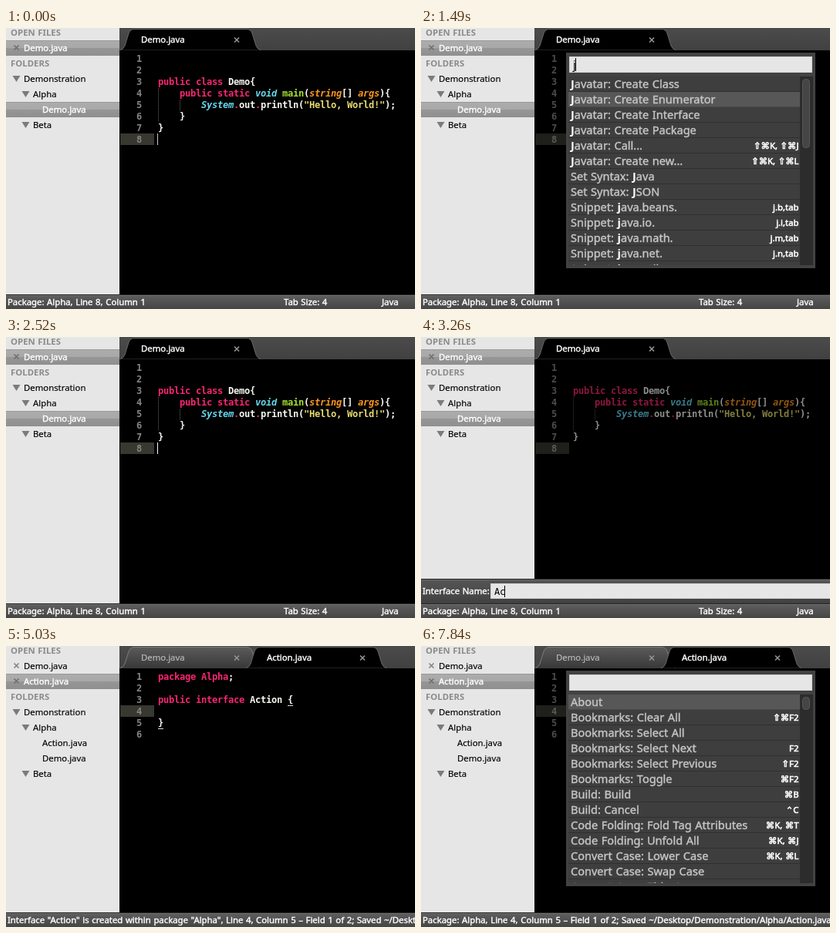
Recreate the animation shown at these times as an HTML page with a canvas. Size 530 by 365 pixels, loop 7.99 s.

```html
<!DOCTYPE html>
<html lang="en">
<head>
<meta charset="utf-8">
<title>Creating a Java interface from the command palette</title>
<style>
html, body { margin: 0; width: 100%; height: 100%; overflow: hidden; background: #000; }
canvas { display: block; }
</style>
</head>
<body>
<canvas id="stage" width="530" height="365"></canvas>
<script>
const ctx = document.getElementById('stage').getContext('2d');
const LOOP = 7990, LINE = 15, COL = 7, CODE_X = 197, CODE_Y = 32, SIDE = 147, ROW = 20;
const UI = '"Noto Sans", "Open Sans", "DejaVu Sans", sans-serif';
const MONO = '"DejaVu Sans Mono", monospace';
const SMALL = 11.35, LARGE = 14.55;

// Timelines: [start in ms, value]
const MODE = [[0, 'code'], [600, 'palette'], [2520, 'code'], [2670, 'panel'], [4290, 'code'], [7400, 'palette']];
const QUERY = [[0, ''], [1490, 'j'], [2080, 'jc'], [2230, 'jci'], [2520, '']];
const NAME = [[0, ''], [3120, 'A'], [3260, 'Ac'], [3550, 'Act'], [3700, 'Acti'], [3850, 'Actio'], [3990, 'Action']];
const CARET = [[0, .8], [150, 0], [600, 1], [1040, .5], [1190, 0], [1490, 1], [1930, .5], [2080, 1],
  [2970, .5], [3120, 1], [4880, .5], [5030, 0], [5470, .5], [5620, 1], [5770, .5], [5910, 0],
  [6360, .5], [6510, 1], [6810, .5], [6960, 0], [7400, 1], [7700, .5], [7840, 0]];
const PLACE = ' Line 4, Column 5 – Field 1 of 2; Saved ~/Desktop/Demonstration/Alpha/Action.java (UTF-8)';
const STATUS = [[0, 'Package: Alpha, Line 8, Column 1'], [4430, 'Package: Alpha,' + PLACE],
  [4730, 'Interface "Action" is created within package "Alpha",' + PLACE], [7400, 'Package: Alpha,' + PLACE]];
const at = (keys, t) => keys.findLast(([start]) => start <= t)[1];

const PINK = '#f92672', BLUE = '#66d9ef', GREEN = '#a6e22e', ORANGE = '#fd971f', YELLOW = '#e6db74', WHITE = '#f8f8f2';

// Code tokens: line, column, colour, text
const DEMO = { lines: 8, row: 8, col: 0, tokens: [
  [3, 0, PINK, 'public class'], [3, 13, WHITE, 'Demo{'],
  [4, 4, PINK, 'public static'], [4, 18, BLUE, 'void'], [4, 23, GREEN, 'main'], [4, 27, WHITE, '('],
  [4, 28, ORANGE, 'string'], [4, 34, WHITE, '[]'], [4, 37, ORANGE, 'args'], [4, 41, WHITE, '){'],
  [5, 8, BLUE, 'System'], [5, 14, PINK, '.'], [5, 15, WHITE, 'out'], [5, 18, PINK, '.'],
  [5, 19, WHITE, 'println('], [5, 27, YELLOW, '"Hello, World!"'], [5, 42, WHITE, ');'],
  [6, 4, WHITE, '}'], [7, 0, WHITE, '}']
] };
const ACTION = { lines: 6, row: 4, col: 4, tokens: [
  [1, 0, PINK, 'package Alpha'], [1, 13, WHITE, ';'],
  [3, 0, PINK, 'public interface'], [3, 17, WHITE, 'Action {'], [5, 0, WHITE, '}']
] };

// Palette rows: label|shortcut, a star marks the next letter as matched
const RESULTS = {
  '': ['About', 'Bookmarks: Clear All|⇧⌘F2', 'Bookmarks: Select All', 'Bookmarks: Select Next|F2',
    'Bookmarks: Select Previous|⇧F2', 'Bookmarks: Toggle|⌘F2', 'Build: Build|⌘B', 'Build: Cancel|⌃C',
    'Code Folding: Fold Tag Attributes|⌘K, ⌘T', 'Code Folding: Unfold All|⌘K, ⌘J',
    'Convert Case: Lower Case|⌘K, ⌘L', 'Convert Case: Swap Case', 'Convert Case: Title Case'],
  j: ['*Javatar: Create Class', '*Javatar: Create Enumerator', '*Javatar: Create Interface',
    '*Javatar: Create Package', '*Javatar: Call...|⇧⌘K, ⇧⌘J', '*Javatar: Create new...|⇧⌘K, ⇧⌘L',
    'Set Syntax: *Java', 'Set Syntax: *JSON', 'Snippet: *java.beans.|j.b,tab', 'Snippet: *java.io.|j.i,tab',
    'Snippet: *java.math.|j.m,tab', 'Snippet: *java.net.|j.n,tab', 'Snippet: *java.util.|j.u,tab'],
  jc: ['*Javatar: *Create Class', '*Javatar: *Create Enumerator', '*Javatar: *Create Interface',
    '*Javatar: *Create Package', '*Javatar: *Call...|⇧⌘K, ⇧⌘J', '*Javatar: *Create new...|⇧⌘K, ⇧⌘L',
    'Snippet: import *junit.framework.Test*Case;|i...', 'Set Syntax: *JavaS*cript',
    'Set Syntax: *JavaS*cript (Rails)', 'Set Syntax: Ob*je*ctive-C', 'Set Syntax: Ob*je*ctive-C++'],
  jci: ['*Javatar: *Create *Interface', 'Snippet: import *junit.framework.Test*Case;|i...',
    'Set Syntax: *JavaS*cr*ipt', 'Set Syntax: *JavaS*cr*ipt (Rails)',
    'Set Syntax: Ob*je*ct*ive-C', 'Set Syntax: Ob*je*ct*ive-C++']
};
const SCROLL_THUMB = { '': 16, j: 89 };

function rect(x, y, w, h, fill) {
  ctx.fillStyle = fill;
  ctx.fillRect(x, y, w, h);
}

function shade(y, h, ...colors) {
  const g = ctx.createLinearGradient(0, y, 0, y + h);
  colors.forEach((c, i) => g.addColorStop(i / (colors.length - 1), c));
  return g;
}

// Interface text; a thin outline of the given width makes it heavier
function text(str, x, y, color, { size = SMALL, weight = 400, align = 'left', heavy = 0 } = {}) {
  ctx.font = `${weight} ${size}px ${UI}`;
  ctx.wordSpacing = size * .056 + 'px';
  ctx.textAlign = align;
  ctx.fillStyle = ctx.strokeStyle = color;
  ctx.fillText(str, x, y);
  if (heavy) {
    ctx.lineWidth = heavy;
    ctx.strokeText(str, x, y);
  }
  return ctx.measureText(str).width;
}

const lightText = (str, x, y) => text(str, x, y, '#fff', { heavy: .4 });
const heading = (str, y) => text(str, 6, y, '#8b8b8b', { weight: 700 });

function mono(str, x, y, color, style = 'bold') {
  ctx.font = `${style} 12px ${MONO}`;
  ctx.textAlign = 'left';
  ctx.fillStyle = color;
  [...str].forEach((ch, i) => ctx.fillText(ch, x + i * COL, y));
}

function cross(x, y, color) {
  ctx.strokeStyle = color;
  ctx.lineWidth = 1.7;
  ctx.beginPath();
  ctx.moveTo(x - 3, y - 3); ctx.lineTo(x + 3, y + 3);
  ctx.moveTo(x + 3, y - 3); ctx.lineTo(x - 3, y + 3);
  ctx.stroke();
}

function caret(x, y, h, color, alpha) {
  ctx.save();
  ctx.globalAlpha *= alpha;
  rect(Math.round(x), y, 1, h, color);
  ctx.restore();
}

function fileRow(name, x, y, selected) {
  if (selected) {
    const top = y - 14;
    rect(0, top, SIDE, ROW, shade(top, ROW, '#adadad', '#a3a3a3'));
    rect(0, top + 10, SIDE, 10, shade(top + 10, 10, '#969696', '#8f8f8f'));
    rect(0, top, SIDE, 1, '#989898');
    lightText(name, x, y);
  } else {
    text(name, x, y, '#000', { heavy: .15 });
  }
}

function openFile(name, y, selected) {
  fileRow(name, 23, y, selected);
  cross(13.5, y - 4.5, selected ? '#707070' : '#858585');
}

function folder(label, x, y) {
  ctx.fillStyle = '#7b7b7b';
  ctx.beginPath();
  ctx.moveTo(x, y - 8); ctx.lineTo(x + 10, y - 8); ctx.lineTo(x + 5, y);
  ctx.fill();
  text(label, x + 14.5, y, '#000', { heavy: .15 });
}

function sidebar(created) {
  rect(0, 0, SIDE, 346, '#e6e6e6');
  let y = 10;
  const next = () => y += ROW;
  heading('OPEN FILES', y);
  openFile('Demo.java', next(), !created);
  if (created) openFile('Action.java', next(), true);
  heading('FOLDERS', next());
  folder('Demonstration', 8.5, next());
  folder('Alpha', 20.5, next());
  if (created) fileRow('Action.java', 47, next(), false);
  fileRow('Demo.java', 47, next(), !created);
  folder('Beta', 20.5, next());
}

function tab(label, x, active) {
  ctx.beginPath();
  ctx.moveTo(x, 28.5);
  ctx.quadraticCurveTo(x + 4, 28, x + 6, 23);
  ctx.lineTo(x + 11, 7);
  ctx.quadraticCurveTo(x + 13, 1.5, x + 18, 1.5);
  ctx.lineTo(x + 164, 1.5);
  ctx.quadraticCurveTo(x + 169, 1.5, x + 171, 7);
  ctx.lineTo(x + 176, 23);
  ctx.quadraticCurveTo(x + 178, 28, x + 182, 28.5);
  ctx.fillStyle = active ? '#000' : shade(2, 27, '#5a5a5a', '#383838');
  ctx.fill();
  ctx.strokeStyle = active ? '#686868' : '#7c7c7c';
  ctx.lineWidth = 1;
  ctx.stroke();
  text(label, x + 27, 19, active ? '#fff' : '#b8b8b8', { heavy: active ? .4 : .2 });
  cross(x + 151, 15.5, '#929292');
}

function editor(doc, created, dim, caretAlpha) {
  rect(SIDE, 0, 383, 346, '#000');
  rect(SIDE, 0, 383, 29, shade(0, 29, '#4b4b4b', '#414141'));
  tab('Demo.java', 148, !created);
  if (created) tab('Action.java', 311, true);
  rect(SIDE, 29, 383, 3, '#000');

  ctx.save();
  if (dim) ctx.globalAlpha = .57;
  const top = CODE_Y + (doc.row - 1) * LINE;
  rect(148, top, 44, LINE, '#383830');
  for (let n = 1; n <= doc.lines; n++) mono(String(n), 169, CODE_Y + n * LINE - 3, '#858585');
  for (const [line, col, color, str] of doc.tokens) {
    const italic = color === BLUE || color === ORANGE;
    mono(str, CODE_X + col * COL, CODE_Y + line * LINE - 3, color, italic ? 'italic bold' : 'bold');
  }
  if (created) {
    rect(365, 77, 7, 1, '#ddd');
    rect(197, 107, 7, 1, '#ddd');
  } else {
    for (let y = 78; y < 122; y += 2) {
      rect(197, y, 1, 1, '#666');
      if (y > 92 && y < 107) rect(225, y, 1, 1, '#666');
    }
  }
  if (!dim) caret(CODE_X - 1 + doc.col * COL, top, LINE, WHITE, caretAlpha);
  ctx.restore();
}

function matched(label, x, y) {
  for (const part of label.split(/(\*.)/)) {
    x += part[0] === '*'
      ? text(part[1], x, y, '#fff', { size: LARGE, weight: 700 })
      : text(part, x, y, '#c6c6c6', { size: LARGE, heavy: .4 });
  }
}

function field(x, y, w, h) {
  rect(x, y, w, h, '#d2d2d2');
  rect(x + 1, y + 1, w - 2, h - 2, '#e6e6e6');
}

function palette(query, caretAlpha) {
  const rows = RESULTS[query], thumb = SCROLL_THUMB[query];
  const listH = Math.min(rows.length * ROW, 245);
  const right = thumb ? 491 : 508;
  rect(188, 32, 323, listH + 35, '#424242');
  field(192, 37, 315, 21);
  const w = text(query, 197, 53, '#000', { size: LARGE });
  caret(196 + w, 39, 17, '#000', caretAlpha);

  ctx.save();
  ctx.beginPath();
  ctx.rect(191, 63, 317, listH);
  ctx.clip();
  rows.forEach((row, i) => {
    const y = 63 + i * ROW;
    const [label, keys = ''] = row.split('|');
    const chosen = i === (query === 'j' ? 1 : 0);
    rect(191, y, right - 191, ROW, chosen ? '#575757' : '#3e3e3e');
    rect(191, y + 19, right - 191, 1, chosen ? '#4a4a4a' : '#303030');
    matched(label, 194, y + 15);
    text(keys, thumb ? 489.5 : 501, y + 14, '#fff', { align: 'right', heavy: .6 });
  });
  if (thumb) {
    rect(491, 63, 17, listH, '#2c2c2c');
    ctx.beginPath();
    ctx.roundRect(494.5, 66.5, 9, thumb, 4);
    ctx.fillStyle = '#454545';
    ctx.fill();
    ctx.strokeStyle = '#575757';
    ctx.lineWidth = 1;
    ctx.stroke();
  }
  ctx.restore();
}

function panel(name, caretAlpha) {
  rect(0, 314, 530, 32, shade(314, 32, '#565656', '#414141'));
  rect(0, 314, 530, 1, '#222');
  rect(0, 315, 530, 1, '#6c6c6c');
  lightText('Interface Name:', 2, 334);
  field(90, 320, 441, 20);
  mono(name, 95, 335, '#000', 'normal');
  caret(94 + name.length * COL, 323, 15, '#000', caretAlpha);
}

function statusBar(status, created) {
  rect(0, 346, 530, 19, shade(347, 18, '#5e5e5e', '#454545'));
  rect(0, 346, 530, 1, '#242424');
  rect(0, 347, 530, 1, '#6e6e6e');
  lightText(status, 2, 360);
  if (!created) {
    lightText('Tab Size: 4', 360, 360);
    lightText('Java', 487, 360);
  }
}

function draw(t) {
  const mode = at(MODE, t), alpha = at(CARET, t), created = t >= 4430;
  editor(created ? ACTION : DEMO, created, mode !== 'code', alpha);
  sidebar(created);
  if (mode === 'palette') palette(at(QUERY, t), alpha);
  if (mode === 'panel') panel(at(NAME, t), alpha);
  statusBar(at(STATUS, t), created);
}

const start = performance.now();
function frame() {
  draw((performance.now() - start) % LOOP);
  requestAnimationFrame(frame);
}
frame();
</script>
</body>
</html>
```
